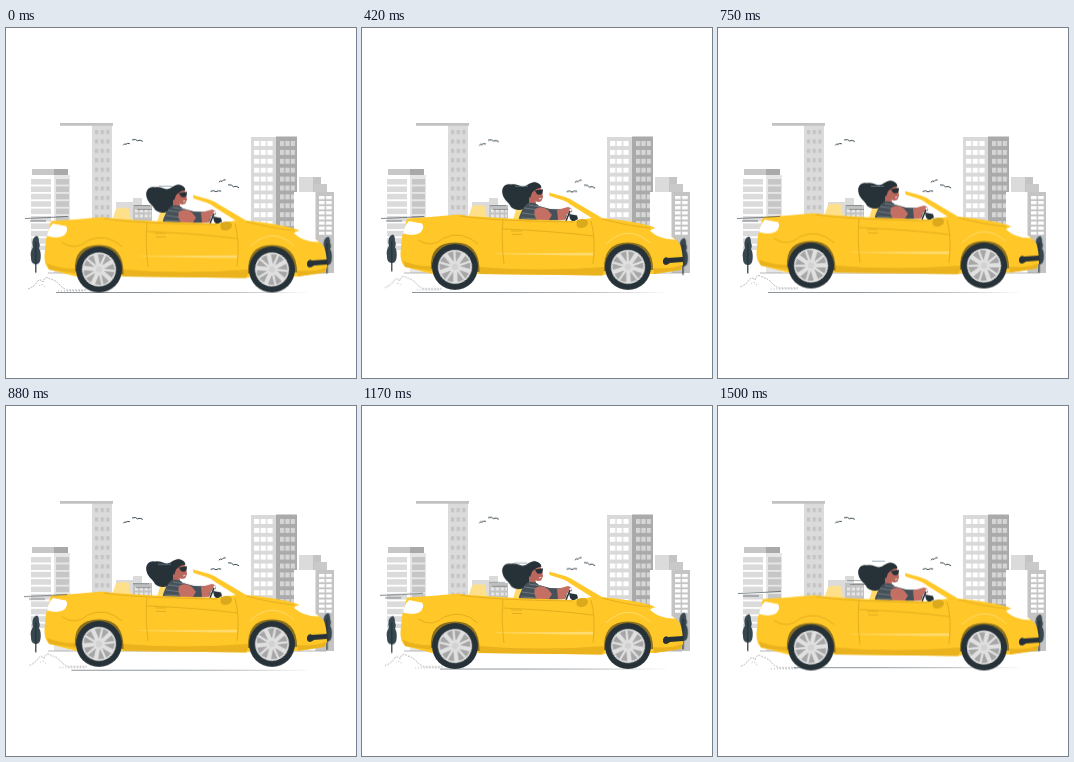
Recreate the animation shown at these times as an HTML page. Size 350 by 350 pixels, loop 1.54 s.

```html
<!DOCTYPE html>
<html lang="en">
<head>
<meta charset="utf-8">
<title>City drive</title>
<style>
html, body { margin: 0; width: 100%; height: 100%; overflow: hidden; background: #fff; }
svg { display: block; width: 100%; height: 100%; }
:root { --loop: 1540ms; --half: 770ms; --sine: cubic-bezier(.37, 0, .63, 1); }

.car { animation: bob var(--half) var(--sine) -40ms infinite alternate; }
@keyframes bob { from { transform: translateY(1.5px); } to { transform: translateY(-2.5px); } }

.tree { animation: sway var(--half) var(--sine) -1210ms infinite alternate; }
.tree.late { animation-delay: -440ms; }
@keyframes sway { from { transform: translateY(-1.2px); } to { transform: translateY(2.5px); } }

.birds { animation: hover var(--half) var(--sine) -300ms infinite alternate; }
@keyframes hover { from { transform: translateY(-.3px); } to { transform: translateY(.3px); } }

.spin { animation: spin var(--half) linear infinite; }
@keyframes spin { to { transform: rotate(360deg); } }

.road { transform-origin: 306px 264px; animation: road var(--loop) linear infinite; }
@keyframes road {
  0%, 49% { transform: none; }
  65% { transform: translate(2px, -.5px) scaleX(.89); }
  86% { transform: translate(3px, -2.3px) scaleX(.91); }
  97.4%, 99.9% { transform: translate(0, -2.8px) scaleX(.9); }
}

.wind { animation: wind var(--loop) linear infinite; }
@keyframes wind {
  0%, 49% { transform: none; }
  65% { transform: translate(-2px, .3px); }
  86% { transform: translate(0, -2.6px); }
  97.4%, 99.9% { transform: translate(1px, -3px); }
}

.dust { animation: dust var(--loop) linear infinite; }
@keyframes dust { to { stroke-dashoffset: 36; } }

.puff { animation: puff var(--loop) linear infinite; }
@keyframes puff {
  0%, 100% { transform: none; }
  16% { transform: translate(1px, -.8px); }
  49% { transform: translate(0, -2px); }
  65% { transform: translate(2px, -1px); }
  86% { transform: translate(0, -1.5px); }
}

.hair { transform-origin: 172px 160px; animation: hair var(--half) var(--sine) -300ms infinite alternate; }
@keyframes hair { from { transform: rotate(-.4deg); } to { transform: rotate(.4deg); } }
</style>
</head>
<body>
<svg viewBox="0 0 350 350">
  <defs>
    <pattern id="slats" x="25" y="151" width="20" height="7.4" patternUnits="userSpaceOnUse">
      <path d="M0 0H20V5.6H0z" fill="#dbdbdb"/>
    </pattern>
    <pattern id="panes" x="50" y="151" width="13" height="7.4" patternUnits="userSpaceOnUse">
      <path d="M0 0H13V5.6H0z" fill="#c6c6c6"/>
    </pattern>
    <pattern id="dots" x="89" y="102" width="5.7" height="9.4" patternUnits="userSpaceOnUse">
      <path d="M0 0H3.2V4.2H0z" fill="#c4c4c4"/>
    </pattern>
    <pattern id="bright" x="248" y="113" width="6.7" height="8.9" patternUnits="userSpaceOnUse">
      <path d="M0 0H5.3V5H0z" fill="#fff"/>
    </pattern>
    <pattern id="shade" x="274" y="113" width="5.4" height="8.9" patternUnits="userSpaceOnUse">
      <path d="M0 0H4.2V5H0z" fill="#d6d6d6"/>
    </pattern>
    <pattern id="small" x="313" y="168" width="7.2" height="5.1" patternUnits="userSpaceOnUse">
      <path d="M0 0H5.7V3.1H0z" fill="#fff"/>
    </pattern>

    <g id="tree">
      <path d="M30 208C32 207 33 210 33 214C34 216 34 218 33 220C35 223 35 228 34.5 231C34 235 32 236 30 236C26 236 25 233 25 229C24 225 25 222 27 219C25.5 214 27 209 30 208Z" fill="#37474f"/>
      <path d="M29.8 214V244.5" stroke="#263238" stroke-width="1.2"/>
    </g>
    <g id="spoke" fill="#a6a6a6">
      <path d="M-1.2 -5L-7 -13.4Q-4.5 -15.3 -1 -15.6Z"/>
      <path d="M1.2 -5L7 -13.4Q4.5 -15.3 1 -15.6Z"/>
    </g>
    <g id="wheel">
      <circle r="23" fill="#263238"/>
      <g class="spin">
        <circle r="17" fill="#e0e0e0"/>
        <use href="#spoke"/>
        <use href="#spoke" transform="rotate(72)"/>
        <use href="#spoke" transform="rotate(144)"/>
        <use href="#spoke" transform="rotate(216)"/>
        <use href="#spoke" transform="rotate(288)"/>
        <circle r="3.2" fill="#d2d2d2"/>
      </g>
    </g>
  </defs>

  <g class="city">
    <path d="M26 141H48V147H26z" fill="#c7c7c7"/>
    <path d="M48 141H62V147H48z" fill="#a9a9a9"/>
    <path d="M25 151H45V222H25z" fill="url(#slats)"/>
    <path d="M48 147H64V245H48z" fill="#e6e6e6"/>
    <path d="M50 151H63V240H50z" fill="url(#panes)"/>

    <path d="M86 97H106V192H86z" fill="#dbdbdb"/>
    <path d="M89 102H104V190H89z" fill="url(#dots)"/>
    <path d="M54 95H107V97.7H54z" fill="#c2c2c2"/>

    <path d="M110 174H127V170H136V192H110z" fill="#dbdbdb"/>
    <path d="M127 177H146V193H127z" fill="#c2c2c2"/>
    <path d="M129 183H145M129 188H145" stroke="#e6e6e6" stroke-width="3" stroke-dasharray="3.2 1.6"/>

    <path d="M245 109H270V204H245z" fill="#d9d9d9"/>
    <path d="M270 108.5H291V204H270z" fill="#aaa"/>
    <path d="M248 113H267.5V200H248z" fill="url(#bright)"/>
    <path d="M274 113H289.5V200H274z" fill="url(#shade)"/>

    <path d="M293 149H307V164H293z" fill="#dbdbdb"/>
    <path d="M307 149H315V164H307z" fill="#c4c4c4"/>
    <path d="M308 156H321V165H308z" fill="#c9c9c9"/>
    <path d="M288 164H310V245H288z" fill="#fff"/>
    <path d="M309.5 164H328V245H309.5z" fill="#c4c4c4"/>
    <path d="M313 168H326V207H313z" fill="url(#small)"/>
    <path d="M42 245H320" stroke="#999" stroke-width=".7"/>
  </g>

  <g class="birds" fill="none" stroke="#37474f" stroke-width="1" stroke-linecap="round">
    <path d="M117.5 117Q118.5 115 120 116.3Q121.5 114.7 123.5 115.6"/>
    <path d="M126.5 111.8Q130 110.8 131.5 112.8Q134 111.4 136.5 113.2"/>
    <path d="M213 154Q214.2 152 216 153.5Q217 151.4 219.3 151.8"/>
    <path d="M205 163.2Q208 161.8 210 163.8Q212 162.2 214.8 163"/>
    <path d="M222.5 156.8Q226 156.4 227.5 158.8Q230 157.4 232.8 159.6"/>
  </g>

  <use href="#tree" class="tree"/>
  <g transform="translate(291.2 0)"><use href="#tree" class="tree late"/></g>

  <path class="road" d="M50 264.1Q178 263.8 306 264.4Q178 265 50 264.7Z" fill="#69737a"/>
  <g class="puff" fill="none" stroke="#777" stroke-width=".6">
    <path class="dust" stroke-dasharray="1.8 1.2" d="M22 261Q29 258 31 254Q34 250 37 254Q39 247 44 251Q49 252 53 256Q56 260 61 262H80"/>
    <path class="dust" stroke-dasharray="1 2" d="M33 258Q37 254 39 260M52 263H78"/>
  </g>

  <g class="car">
    <path d="M101 190L107 188L110 179.5Q116 177.5 123 179L125 191H101Z" fill="#ffe08a"/>
    <path d="M151 193L154.5 181Q158 177 163 179L161 194Z" fill="#ffda69"/>

    <g class="driver">
      <g transform="translate(0 2.2)">
        <path class="hair" d="M178.5 157C175 152 169 153 165 156C159 160 156 154 149 155.5C143 154 139 159 140.5 165C141.5 171 147 173 149 178C153 182 161 182 165 178C171 174 168 168 173 163Z" fill="#263238"/>
        <path d="M167 165L178 157L180.4 164L181 168L179.3 172Q176 173.5 173.5 172L175 178L167 177Z" fill="#b9665c"/>
        <path d="M166 166Q165 153 173 153Q179 154 179.5 158.5Q173 159 170 163.5L168 169Z" fill="#263238"/>
        <path d="M172 161.5L180.8 160Q181.6 165 178 165.5Q174.5 166 173.8 162.5Z" fill="#263238"/>
        <path d="M177 169.8L179.3 169.2" stroke="#fff" stroke-width=".8"/>
      </g>
      <path d="M166 176Q173 175 177 179L188 182L204 182.5L205 193L156 195Q159 181 166 176Z" fill="#455058"/>
      <path d="M162 181L177 183M160 186L175 188M167 178L179 180M159 191L176 192" stroke="#78838a" stroke-width=".8"/>
      <path d="M173 182Q180 178 186 183L190 188L187 193H175Q171 188 173 182Z" fill="#c36f63"/>
      <path d="M195 183L206 180Q211 181 210 185L204 188L203 193H196Z" fill="#c36f63"/>
      <path d="M209 182Q207 188 203 195" fill="none" stroke="#fff" stroke-width="2"/>
      <path d="M207 187L215 188.5L216 192L211 195L208 192Z" fill="#263238"/>
      <path d="M208 184L204 194M212 189L210 196" stroke="#263238" stroke-width="1.5"/>
    </g>

    <path d="M187 165.5L203 170Q208 171.5 213 175L240 191L236 195L209 178Q205 174.5 200 173L187.5 169Z" fill="#ffc727"/>

    <path d="M45 191.5Q70 190.2 94 187.7Q100 187.5 105 189L155 192L212 194L233 190.5Q267 193 290 199.5L296 202.5Q313 210 318 217Q321 225 321 238Q319 243 312 244L292 247H246L240 248.5L117 247H70L43 240Q38 235 38.5 226L40 210Z" fill="#ffc727"/>
    <path d="M117 240Q175 245 244 240L240 248.6L117 247.1Z" fill="#eab21d"/>
    <path d="M291 241Q308 243 320 238L319 243L292 247Z" fill="#eab21d"/>
    <path d="M41 234Q55 240 70 239V244L43 240Z" fill="#eab21d"/>
    <path d="M134 226.4Q185 226.3 231 225.7V228.6Q185 228.4 134 227Z" fill="#ffdc70"/>

    <path d="M47 194Q55 195.5 60 196.5Q63 201 58 206Q51 209.5 41 206.5Q42 199 47 194Z" fill="#fff"/>
    <path d="M288 204C291 200 297 200.5 303 204.5L313 212.5Q298 213 288 204Z" fill="#fff"/>

    <g fill="none" stroke="#d9a51c" stroke-width=".7">
      <path d="M141 193Q139 213 142 237M229 194Q234 212 231 237"/>
      <path d="M56 213Q70 222 82 211Q100 203 116 217"/>
      <path d="M98 189Q130 194 211 195"/>
      <path d="M240 192Q266 199 288 201M141 202Q190 204 231 209"/>
      <path d="M149 204H160M150 207.5H160"/>
    </g>
    <path d="M244 217Q266 196 288 216" fill="none" stroke="#ffdc70" stroke-width="1"/>
    <path d="M215 193Q224 190 226 195Q226 201 218 201Q213 200 215 193Z" fill="#dba91c"/>

    <g fill="#8b701f">
      <path d="M69 242Q67 215.5 93 215.5Q118 215.5 117.5 245Z"/>
      <path d="M242 244Q241 215.5 266 215.5Q291 215.5 291 243Z"/>
    </g>
    <path d="M301 233Q303 229 306 231L321 230V235L308 236Q303 240 301 236Z" fill="#263238"/>

    <g transform="translate(93 240)"><use href="#wheel"/></g>
    <g transform="translate(266 240)"><use href="#wheel"/></g>
  </g>

  <g class="wind" fill="none" stroke="#4b555b" stroke-width=".7">
    <path d="M19 190.5Q40 189.8 62 188.4M24 193H40"/>
    <path d="M128 177.6H144M131 181.4H146" stroke-width=".5"/>
    <path d="M153 158.2H166" stroke="#78909c"/>
  </g>
</svg>
</body>
</html>
```
